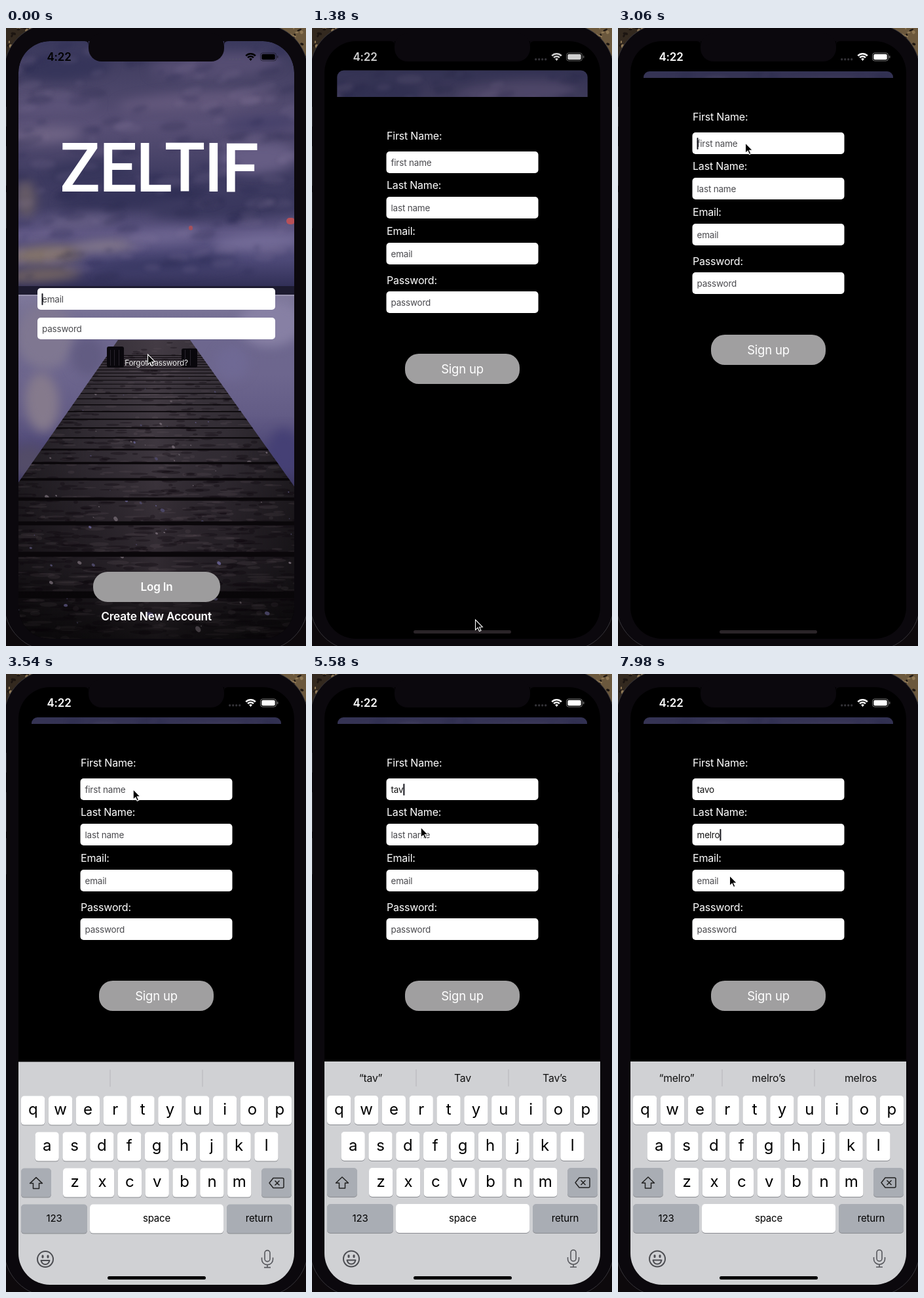
An HTML page with a canvas for the animation above (8000 ms loop, 458 px wide and 941 px high).

```html
<!DOCTYPE html>
<html lang="en">
<head>
<meta charset="utf-8">
<title>Sign up</title>
<style>
html, body { margin: 0; width: 100%; height: 100%; overflow: hidden; background: #000; }
canvas { display: block; }
</style>
</head>
<body>
<canvas id="stage" width="458" height="941"></canvas>
<script>
const W = 458, H = 941, LOOP = 8000;
let g = document.getElementById('stage').getContext('2d');

let seed = 7;
const rnd = () => (seed = seed * 16807 % 2147483647) / 2147483647;
const clamp = v => Math.min(1, Math.max(0, v));
const mix = (a, b, k) => a + (b - a) * k;
const smooth = k => k * k * (3 - 2 * k);
const spring = (t, start, w) => {
  const x = Math.max(0, t - start) / 1000 * w;
  return 1 - (1 + x) * Math.exp(-x);
};

function box(x, y, w, h, r, color) {
  g.fillStyle = color;
  g.beginPath();
  g.roundRect(x, y, w, h, r);
  g.fill();
}

function oval(x, y, rx, ry, turn, color) {
  g.fillStyle = color;
  g.beginPath();
  g.ellipse(x, y, rx, ry, turn, 0, 7);
  g.fill();
}

function poly(points, color) {
  g.fillStyle = color;
  g.beginPath();
  points.forEach(p => g.lineTo(...p));
  g.closePath();
  g.fill();
}

function text(s, x, y, size, color, align = 'left', weight = 400) {
  g.font = `${weight} ${size}px Inter, Roboto, sans-serif`;
  g.letterSpacing = '-0.2px';
  g.textAlign = align;
  g.fillStyle = color;
  g.fillText(s, x, y);
}

function gradient(x0, y0, x1, y1, colors) {
  const f = g.createLinearGradient(x0, y0, x1, y1);
  colors.forEach((c, i) => f.addColorStop(i / (colors.length - 1), c));
  return f;
}

function layer(paint) {
  const c = document.createElement('canvas'), main = g;
  c.width = W;
  c.height = H;
  g = c.getContext('2d');
  paint();
  g = main;
  return c;
}

// Soft patches: x, y, half width, half height, colour
const CLOUDS = [
  [320, 58, 100, 20, '#554d72'], [90, 60, 70, 20, '#36355a'], [80, 118, 60, 13, '#5c5379'],
  [290, 112, 120, 14, '#62577b'], [60, 163, 55, 12, '#6f6485'], [390, 145, 60, 12, '#46416a'],
  [385, 198, 60, 24, '#665d84'], [130, 218, 65, 18, '#37365b'], [190, 258, 110, 16, '#343359'],
  [340, 272, 120, 18, '#3a385e'], [30, 260, 16, 28, '#665b66'], [110, 295, 60, 9, '#665e84'],
  [385, 326, 70, 13, '#736b97'], [245, 360, 110, 12, '#3a3964'], [60, 345, 60, 13, '#85756a'],
  [150, 332, 50, 9, '#857a8c'], [55, 376, 60, 9, '#786861'], [240, 318, 60, 9, '#6d6590']
];
const REFLECTIONS = [
  [60, 470, 45, 50, '#7f7791'], [55, 570, 26, 45, '#857a8c'], [405, 450, 50, 35, '#8780a4'],
  [425, 645, 25, 35, '#454075'], [35, 660, 30, 25, '#534c68'], [345, 510, 25, 25, '#6f6994'],
  [125, 500, 25, 30, '#625c82']
];

function patches(list) {
  g.filter = 'blur(8px)';
  for (const [x, y, rx, ry, color] of list) oval(x, y, rx, ry, -.06, color);
  g.filter = 'none';
}

const photo = layer(() => {
  g.fillStyle = gradient(0, 20, 0, 395, ['#3a395d', '#444063', '#4d476b', '#595076',
    '#4c466b', '#3d3a60', '#403d63', '#5f5784', '#4d4977', '#302e55']);
  g.fillRect(0, 0, W, 396);
  patches(CLOUDS);
  // Ragged cloud edges
  g.filter = 'blur(3px)';
  for (let i = 0; i < 170; i++) {
    const dark = rnd() < .55, r = 5 + rnd() * 18;
    oval(rnd() * W, 25 + rnd() * 355, r, 2 + r * .25, -.35 + rnd() * .4,
      dark ? 'rgba(38,37,76,.22)' : 'rgba(145,125,160,.14)');
  }
  g.filter = 'none';
  box(279, 301, 6, 7, 3, '#a4505c');
  box(428, 289, 13, 10, 5, '#b85058');

  g.fillStyle = gradient(0, 406, 0, 710, ['#7f799b', '#6d678e', '#6d668e', '#635c86', '#4b4574', '#38335d']);
  g.fillRect(0, 406, W, H);
  patches(REFLECTIONS);
  box(0, 393, W, 13, 0, '#1d1b30');
  box(0, 406, W, 2, 0, '#9994b0');

  // Pier
  g.save();
  g.beginPath();
  [[171, 475], [281, 475], [440, 698], [458, 722], [458, H], [0, H], [0, 717], [19, 692]]
    .forEach(p => g.lineTo(...p));
  g.clip();
  g.fillStyle = gradient(0, 475, 0, 930, ['#3b343d', '#38323a', '#332d35', '#2a242b', '#231e24', '#191519']);
  g.fillRect(0, 470, W, H);
  g.fillStyle = gradient(19, 0, 440, 0, ['rgba(0,0,0,.4)', 'rgba(0,0,0,.1)', 'rgba(120,105,115,.14)',
    'rgba(0,0,0,.05)', 'rgba(0,0,0,.4)']);
  g.fillRect(0, 470, W, H);
  for (let i = 0; i < 1300; i++) {
    const y = 478 + rnd() * 455, d = (y - 405) / 500;
    oval(rnd() * W, y, 3 + rnd() * 22 * d, 1 + rnd() * 3 * d, 0,
      rnd() < .6 ? 'rgba(10,6,10,.3)' : 'rgba(125,110,120,.13)');
  }
  for (let i = 0; i < 110; i++) {
    const y = 500 + rnd() * 420, d = (y - 405) / 500, r = .8 + rnd() * rnd() * 6 * d;
    oval(rnd() * W, y, r, r * .7, rnd(), ['#5f5984', '#6c626b', '#4b4664', '#635a62'][i % 4]);
  }
  for (let n = 0; n < 26; n++) {
    const depth = 1 / (.002183 + n * .00034), h = Math.max(1, depth * depth * .00005);
    box(0, 405 + depth - h / 2, W, h, 0, '#0a070a');
  }
  g.fillStyle = gradient(0, 820, 0, 930, ['rgba(0,0,0,0)', 'rgba(0,0,0,.45)']);
  g.fillRect(0, 820, W, 120);
  g.restore();
  box(154, 485, 26, 32, 3, '#09070c');
  box(268, 488, 24, 29, 3, '#09070c');
  for (const x of [159, 165, 172, 273, 281]) box(x, 490, 1, 24, 0, '#28232c');
});

const bezel = layer(() => {
  g.fillStyle = '#0d090c';
  g.fillRect(0, 0, W, H);
  box(0, 0, 60, 60, 0, '#33291f');
  box(W - 60, 0, 60, 60, 0, '#6b583d');
  for (let i = 0; i < 60; i++) {
    const right = i % 2;
    oval(right ? W - rnd() * 45 : rnd() * 45, rnd() * 45, 1 + rnd() * 3, 1 + rnd() * 2, rnd() * 3,
      rnd() < .5 ? '#8f7855' : '#1c1511');
  }
  box(-3, -6, 464, 954, 72, '#0b080d');
  g.strokeStyle = '#37353a';
  g.stroke();
  [[120, 30], [180, 60], [250, 55]].forEach(([y, h]) => box(0, y, 1, h, 0, '#252328'));
  g.globalCompositeOperation = 'destination-out';
  box(19, 20, 421, 910, 48, '#000');
  g.globalCompositeOperation = 'source-over';
  box(126, 8, 207, 43, 20, '#0b080d');
  for (const [x, r] of [[120, 0], [333, 1]]) {
    g.beginPath();
    g.moveTo(x, 20);
    g.lineTo(x + 6, 20);
    if (r) g.quadraticCurveTo(x, 20, x, 26);
    else { g.lineTo(x + 6, 26); g.quadraticCurveTo(x + 6, 20, x, 20); }
    g.fill();
  }
});

function caret(x, y, t, from) {
  g.globalAlpha = clamp(.5 + 1.5 * Math.cos((t - from) / 900 * 2 * Math.PI));
  box(x, y, 2, 18, 1, '#15151c');
  g.globalAlpha = 1;
}

function field(x, y, w, value, hint) {
  box(x, y, w, 33, 5, '#fff');
  text(value || hint, x + 7, y + 21.5, 13.5, value ? '#111' : '#4a4a4e');
}

function login(t, p) {
  const s = 1 - .095 * p;
  g.save();
  g.translate(229.5, 20 + 46 * p);
  g.scale(s, s);
  g.translate(-229.5, -20);
  g.beginPath();
  g.roundRect(19, 20, 421, 910, mix(48, 10, p));
  g.clip();
  g.drawImage(photo, 0, 0);
  g.font = '500 103px Roboto, Inter, sans-serif';
  g.letterSpacing = '-2px';
  g.textAlign = 'center';
  g.fillStyle = '#fff';
  g.fillText('ZELTIF', 233, 249);
  field(48, 396, 363, '', 'email');
  field(48, 441, 363, '', 'password');
  caret(54.5, 404, t, 140);
  text('Forgot Password?', 229.5, 514, 11.8, '#eee', 'center');
  box(133, 828, 194, 46, 22, '#9d9c9d');
  text('Log In', 230, 857, 17, '#fff', 'center', 600);
  g.globalAlpha = t > 960 ? .3 : 1;
  text('Create New Account', 229.5, 902, 17.3, '#fff', 'center', 600);
  g.globalAlpha = .1 * p;
  box(0, 0, W, H, 0, '#000');
  g.restore();
}

// Key times of the two typed words
const FIRST = { word: 'tavo', keys: [5000, 5300, 5560, 5800] };
const LAST = { word: 'melro', keys: [7140, 7320, 7500, 7680, 7860] };
const FOCUS = 3060, NEXT = 6900;
const typed = (f, t) => f.word.slice(0, f.keys.filter(k => k <= t).length);

function sheet(t, p) {
  const first = typed(FIRST, t), last = typed(LAST, t);
  g.save();
  g.translate(0, Math.round((1 - p) * 854));
  box(19, 76, 421, 900, 0, '#000');
  const rows = [
    ['First Name:', 141, 159, first, 'first name'],
    ['Last Name:', 216, 228, last, 'last name'],
    ['Email:', 286, 298, '', 'email'],
    ['Password:', 361, 372, '', 'password']
  ];
  for (const [label, base, y, value, hint] of rows) {
    text(label, 114, base, 16, '#fff');
    field(113.5, y, 232, value, hint);
  }
  if (t >= FOCUS) {
    const onLast = t >= NEXT, f = onLast ? LAST : FIRST;
    const from = Math.max(onLast ? NEXT : FOCUS, ...f.keys.filter(k => k <= t));
    g.font = '400 13.5px Inter, Roboto, sans-serif';
    g.letterSpacing = '-0.2px';
    caret(120.5 + g.measureText(onLast ? last : first).width, onLast ? 236 : 167, t, from);
  }
  box(142, 467, 175, 46, 21, '#a09fa0');
  text('Sign up', 229.5, 496.5, 18.5, '#fff', 'center');
  g.restore();
}

function key(x, y, w, label, gray, size = 24) {
  box(x, y + 1, w, 44, 5, '#898b90');
  box(x, y, w, 44, 5, gray ? '#a9adb4' : '#fff');
  text(label, x + w / 2, y + (size > 20 ? 28.5 : 26.5), size, '#000', 'center');
}

function line(d, width = 1.5, color = '#222') {
  g.strokeStyle = color;
  g.lineWidth = width;
  g.stroke(new Path2D(d));
}

function suggestions(t) {
  if (t >= NEXT) {
    const w = typed(LAST, t);
    return w ? [`“${w}”`, w + '’s', w + 's'] : [];
  }
  const w = typed(FIRST, t), cap = w && w[0].toUpperCase() + w.slice(1);
  return w ? [`“${w}”`, cap, cap + '’s'] : [];
}

function keyboard(t) {
  const p = spring(t, 3110, 20);
  if (!p) return;
  g.save();
  g.translate(0, (1 - p) * 340);
  box(19, 590, 421, 345, 0, '#d0d1d4');
  for (const x of [158.5, 299.5]) box(x, 602, 1, 26, 0, '#b5b6ba');
  suggestions(t).forEach((s, i) => text(s, 89.5 + i * 140.5, 621, 15.8, '#111', 'center'));
  [['qwertyuiop', 23], ['asdfghjkl', 44.5], ['zxcvbnm', 87]].forEach(([row, x], r) =>
    [...row].forEach((c, i) => key(x + i * 41.85, 642 + r * 55, 36.3, c)));
  key(23, 752, 46, '', true);
  key(390, 752, 46, '', true);
  key(23, 807, 101, '123', true, 15);
  key(128, 807, 204, 'space', false, 15);
  key(337, 807, 99, 'return', true, 15);
  g.lineJoin = 'round';
  line('M46 766 L36.5 775 H41.5 V783 H50.5 V775 H55.5 Z');
  line('M408 767 H422 Q424 767 424 769 V780 Q424 782 422 782 H408 L402 774.5 Z M410.5 771 l7 7 m0 -7 l-7 7');
  line('M72 890.5 a12 12 0 1 1 -24 0 a12 12 0 1 1 24 0', 2, '#4c4d52');
  line('M53.5 892.5 H66.5 Q65 898.5 60 898.5 Q55 898.5 53.5 892.5 Z', 2, '#4c4d52');
  box(54.5, 884, 3, 5, 1.5, '#4c4d52');
  box(62.5, 884, 3, 5, 1.5, '#4c4d52');
  line('M395 881 a4 4 0 0 1 8 0 v9 a4 4 0 0 1 -8 0 Z M390.5 888 v3 a8.5 8 0 0 0 17 0 v-3 M399 899 v4 M394 903 h10', 1.6, '#56575c');
  g.restore();
}

function statusBar(p) {
  const v = Math.round(255 * p ** 6), c = `rgb(${v},${v},${v})`;
  text('4:22', 81, 50, 17, c, 'center', 600);
  for (let i = 0; i < 4; i++) box(340 + i * 5, 46, 3.4, 3.4, 1.7, p > .5 ? '#333237' : '#55506f');
  [10.2, 6.2].forEach(r => {
    g.beginPath();
    g.arc(373.5, 49.5, r, -2.36, -.78);
    g.lineWidth = 2.6;
    g.strokeStyle = c;
    g.stroke();
  });
  g.fillStyle = c;
  g.beginPath();
  g.moveTo(373.5, 50);
  g.arc(373.5, 49.5, 3.4, -2.36, -.78);
  g.fill();
  g.globalAlpha = .45;
  g.lineWidth = 1;
  g.beginPath();
  g.roundRect(388.5, 38, 24, 12, 3.5);
  g.stroke();
  box(413.8, 42, 1.6, 4, 1, c);
  g.globalAlpha = 1;
  box(390.3, 39.8, 20.4, 8.4, 2, c);
}

// Pointer path: time, x, y
const PATH = [
  [0, 216.5, 497], [120, 216.5, 497], [840, 249.5, 901], [1400, 249.5, 901], [1740, 215, 548],
  [2220, 199, 470], [2400, 199, 470], [2760, 194.5, 175], [3500, 194.5, 175], [4140, 166.5, 232],
  [5500, 166.5, 232], [6100, 160.5, 260], [6680, 160.5, 260], [6880, 160.5, 246],
  [7560, 160.5, 246], [7900, 170.5, 307], [LOOP, 170.5, 307]
];

function pointer(t) {
  const i = PATH.findIndex(k => k[0] > t), a = PATH[i - 1], b = PATH[i];
  const k = smooth((t - a[0]) / (b[0] - a[0]));
  g.save();
  g.translate(mix(a[1], b[1], k), mix(a[2], b[2], k));
  poly([[0, 0], [0, 15.5], [3.6, 12.2], [6, 17.5], [8.5, 16.5], [6.1, 11.2], [10.8, 11]], '#000');
  g.lineWidth = 1.1;
  g.lineJoin = 'miter';
  g.strokeStyle = '#fff';
  g.stroke();
  g.restore();
}

function draw(t) {
  const p = spring(t, 1124, 20.2);
  g.fillStyle = '#000';
  g.fillRect(0, 0, W, H);
  login(t, p);
  if (p) {
    sheet(t, p);
    box(155, 917, 149, 5, 2.5, '#2a2428');
  }
  keyboard(t);
  if (t > 3160) box(155, 917, 150, 5, 2.5, '#000');
  statusBar(p);
  g.drawImage(bezel, 0, 0);
  pointer(t);
}

function frame() {
  draw(performance.now() % LOOP);
  requestAnimationFrame(frame);
}
frame();
</script>
</body>
</html>
```
